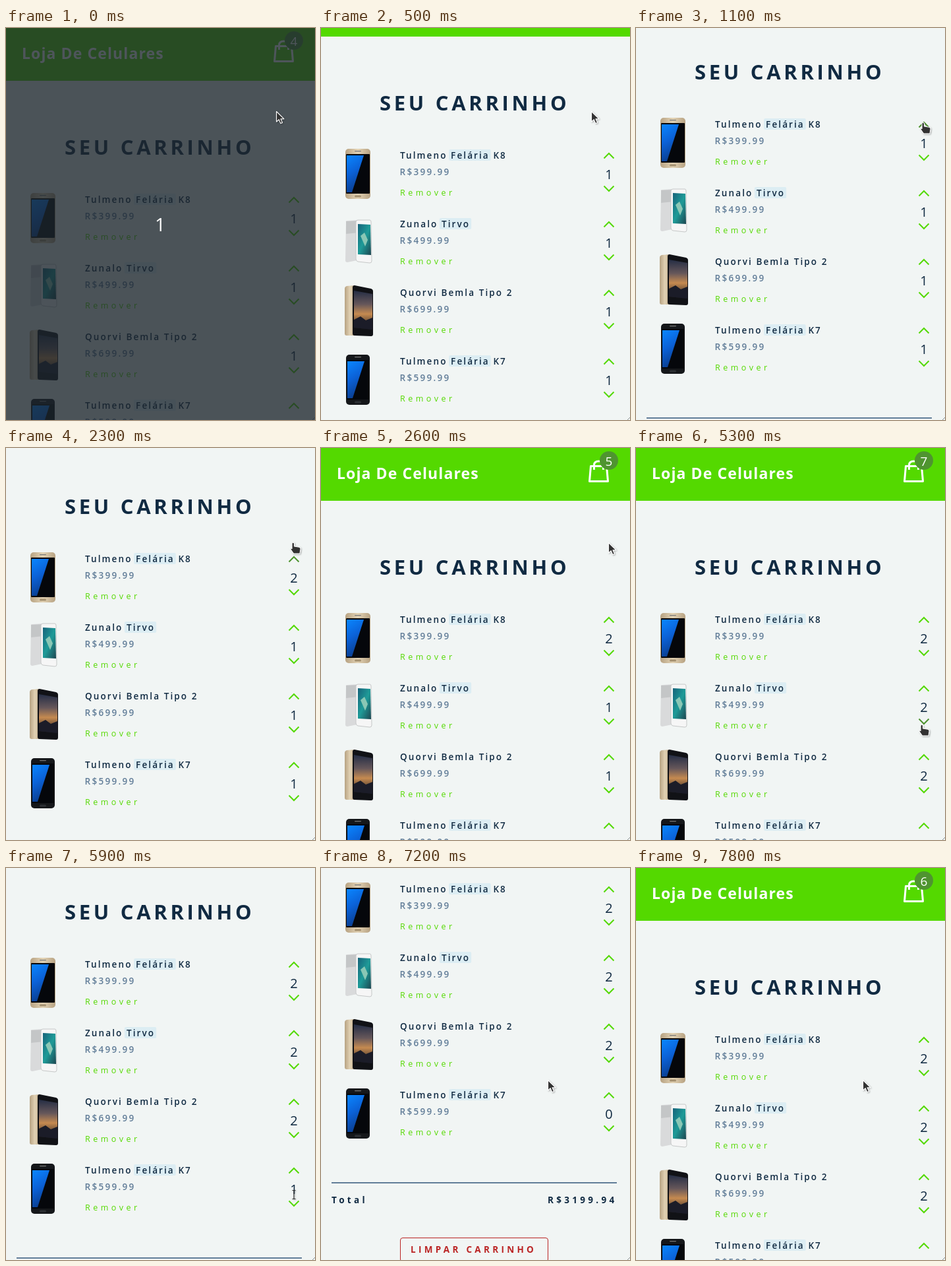
An HTML page for the animation above (8 s loop, 469 by 594 pixels).

```html
<!DOCTYPE html>
<html lang="pt-BR">
<head>
<meta charset="utf-8">
<title>Carrinho</title>
<style>
  html, body { margin: 0; width: 100%; height: 100%; overflow: hidden; background: #f1f5f4; }
  svg { display: block; width: 469px; height: 594px; }
  text { font-family: "Open Sans", "Noto Sans", sans-serif; white-space: pre; fill: #102a42; }
  .store { font-size: 23px; font-weight: 700; letter-spacing: 1.1px; fill: #fff; }
  .title { font-size: 31px; font-weight: 700; letter-spacing: 4.7px; }
  .name { font-size: 13.5px; font-weight: 600; letter-spacing: 2.1px; }
  .price { font-size: 13.5px; font-weight: 600; letter-spacing: 2.3px; fill: #617d98; }
  .remove { font-size: 12.5px; font-weight: 500; letter-spacing: 4.5px; fill: #54d900; }
  .count { font-size: 20px; font-weight: 500; text-anchor: middle; }
  .badge { font-size: 19px; text-anchor: middle; fill: #fff; }
  .total, .clear { font-size: 13.5px; font-weight: 700; letter-spacing: 4.3px; }
  .clear { fill: #bb2525; }
  .timer { font-size: 28px; text-anchor: middle; fill: #fff; }
  .chevron { fill: none; stroke-width: 2; }
</style>
</head>
<body>
<svg id="stage" viewBox="0 0 469 594">
  <defs>
    <linearGradient id="blue" x1="0" y1="0" x2=".3" y2="1">
      <stop offset="0" stop-color="#0a86ff"/><stop offset=".5" stop-color="#0b62d8"/><stop offset="1" stop-color="#0a3f92"/>
    </linearGradient>
    <linearGradient id="gold" x1="0" y1="0" x2="1" y2="0">
      <stop offset="0" stop-color="#b7a282"/><stop offset=".5" stop-color="#e2d2b4"/><stop offset="1" stop-color="#b7a282"/>
    </linearGradient>
    <linearGradient id="dusk" x1="0" y1="0" x2="0" y2="1">
      <stop offset="0" stop-color="#242d44"/><stop offset=".35" stop-color="#66575a"/>
      <stop offset=".6" stop-color="#c58a50"/><stop offset="1" stop-color="#15161f"/>
    </linearGradient>
    <linearGradient id="teal" x1="0" y1="0" x2="1" y2="1">
      <stop offset="0" stop-color="#16637a"/><stop offset=".5" stop-color="#1f9b98"/><stop offset="1" stop-color="#1c4650"/>
    </linearGradient>
    <filter id="shade" x="-50%" y="-50%" width="200%" height="200%">
      <feDropShadow dx="1" dy="1" stdDeviation="1" flood-opacity=".35"/>
    </filter>
  </defs>
</svg>
<script>
const LOOP = 8000, STEP = 100;
const GREEN = '#54d900', GREEN_HOVER = '#4f9430';
const ROW_TOP = 250, ROW_HEIGHT = 104;
const stage = document.getElementById('stage');

function add(parent, tag, attrs = {}, content) {
  const node = document.createElementNS('http://www.w3.org/2000/svg', tag);
  for (const key in attrs) node.setAttribute(key, attrs[key]);
  if (content !== undefined) node.textContent = content;
  parent.append(node);
  return node;
}
const label = (parent, cls, x, y, content) => add(parent, 'text', { class: cls, x, y }, content);
const box = (parent, x, y, width, height, fill, rx = 0) => add(parent, 'rect', { x, y, width, height, fill, rx });
const shape = (parent, d, fill, extra = {}) => add(parent, 'path', { d, fill, ...extra });

const page = add(stage, 'g');

// Header
box(page, 0, 0, 469, 80, GREEN);
label(page, 'store', 24, 47, 'Loja De Celulares');
shape(page, 'M409.5 27.5H433.5L435.5 50.5H407.5ZM414.5 33V26Q414.5 20 421.5 20T428.5 26V33', 'none',
  { stroke: '#fff', 'stroke-width': 3, 'stroke-linejoin': 'round' });
add(page, 'circle', { cx: 437, cy: 19, r: 14, fill: GREEN_HOVER });
const badge = label(page, 'badge', 437, 26.5, '');
label(page, 'title', 89, 192, 'SEU CARRINHO');

// Phones, drawn in coordinates of the first row
function slab(g, x, width, body, key) {
  box(g, x, 250, width, 76, body, 5);
  box(g, x + 1, 258, width - 2, 60, '#05070b', 1);
  shape(g, `M${x + 2} 260H${x + 28}L${x + 10} 316H${x + 2}Z`, 'url(#blue)');
  box(g, x + width / 2 - 5, 253, 10, 1.2, '#777', .6);
  box(g, x + width / 2 - 5, 320.5, 10, 3, key, 1.5);
}
function goldSlab(g) { slab(g, 37, 38, 'url(#gold)', '#a4906f'); }
function blackSlab(g) { slab(g, 38, 36, '#15171a', '#2d3034'); }
function whitePair(g) {
  shape(g, 'M38 257Q37 255 40 255L58 254 60 314 40 318Q37 318 37 315Z', '#d9dadb');
  shape(g, 'M38 256 57 255V273L38 275Z', '#c4c6c7');
  shape(g, 'M56 254 74 254Q76 254 76 257L77 316Q77 319 74 319L56 317Q53 316 53 313V257Q53 254 56 254Z', '#f6f6f6',
    { stroke: '#c6c8c8' });
  shape(g, 'M56 260 75 261 76 307 56 306Z', 'url(#teal)');
  shape(g, 'M60 278 66 273 71 284 67 294Z', '#8ac7b5');
}
function goldPair(g) {
  shape(g, 'M39 250 52 249V325H39Q36 325 36 322V254Q36 251 39 250Z', 'url(#gold)');
  shape(g, 'M51 249 76 254Q79 255 79 258V323Q79 326 76 326L51 325Q48 325 48 322V252Q48 249 51 249Z', '#111216');
  shape(g, 'M50 257 78 262V316L50 313Z', 'url(#dusk)');
  shape(g, 'M50 301 60 296 68 302 78 298V316L50 313Z', '#1b1c28');
}

const items = [
  { name: 'Tulmeno Felária K8', mark: 'Felária', price: 399.99, phone: goldSlab },
  { name: 'Zunalo Tirvo', mark: 'Tirvo', price: 499.99, phone: whitePair },
  { name: 'Quorvi Bemla Tipo 2', price: 699.99, phone: goldPair },
  { name: 'Tulmeno Felária K7', mark: 'Felária', price: 599.99, phone: blackSlab }
];

function highlight(name, content, word) {
  const first = content.indexOf(word);
  const left = name.getStartPositionOfChar(first).x - 3;
  const right = name.getEndPositionOfChar(first + word.length - 1).x + 2;
  name.before(box(name.parentNode, left, 251, right - left, 17, '#dcedf3', 2));
}

const rows = items.map((item, i) => {
  const g = add(page, 'g', { transform: `translate(0 ${i * ROW_HEIGHT})` });
  item.phone(g);
  const name = label(g, 'name', 120, 265, item.name);
  if (item.mark) highlight(name, item.name, item.mark);
  label(g, 'price', 119.5, 290, 'R$' + item.price);
  label(g, 'remove', 120, 321, 'Remover');
  return {
    up: shape(g, 'M429.5 264.5 437 257 444.5 264.5', 'none', { class: 'chevron' }),
    down: shape(g, 'M429.5 306.5 437 314 444.5 306.5', 'none', { class: 'chevron' }),
    count: label(g, 'count', 437, 296, '')
  };
});

// Total and button
box(page, 16, 704, 433, 2, '#617d98');
label(page, 'total', 16, 736, 'Total');
const total = label(page, 'total', 344, 736, '');
add(page, 'rect', { x: 120.5, y: 788.5, width: 224, height: 36, rx: 3.5, fill: 'none', stroke: '#bb2525' });
label(page, 'clear', 136, 811, 'LIMPAR CARRINHO');

shape(stage, 'M465 594 469 590', 'none', { stroke: '#8a9092' });

// Countdown screen
const veil = box(stage, 0, 0, 469, 594, 'rgb(29,38,46)');
const timer = label(stage, 'timer', 234, 308, '1');

// Pointers, each with its hot spot at 0,0
const pointer = add(stage, 'g');
const ink = { stroke: '#fff', 'stroke-width': 1.1, 'stroke-linejoin': 'round', filter: 'url(#shade)' };
const pointers = {
  arrow: shape(pointer, 'M.5 .5V16L4.2 12.7 6.8 18.6 9.5 17.4 7 11.7H11.8Z', '#333', ink),
  hand: shape(pointer, 'M-2 1.5Q-.5 -1 1.5 1.5V6L9 7.2Q11.5 7.8 11 10.5L10 17H.5L-4 10.5Q-4.5 8 -2 9.5Z', '#333', ink),
  beam: shape(pointer, 'M-2.5 -6.5H-.5L0 -6 .5 -6.5H2.5M0 -6V6M-2.5 6.5H-.5L0 6 .5 6.5H2.5', 'none',
    { stroke: '#333', 'stroke-width': 1.2, filter: 'url(#shade)' })
};

// Eased moves: when they begin, how long they last, where they lead
const scrolls = [
  { at: 400, span: 179, to: [114] },
  { at: 2190, span: 390, to: [0] },
  { at: 5400, span: 179, to: [114] },
  { at: 6900, span: 300, to: [228] },
  { at: 7200, span: 200, to: [270] },
  { at: 7600, span: 200, to: [0] }
];
const travels = [
  { at: 700, span: 400, to: [436, 143] },
  { at: 2700, span: 600, to: [441, 366] },
  { at: 3400, span: 200, to: [441, 394] },
  { at: 3600, span: 700, to: [439, 470] },
  { at: 4500, span: 800, to: [434, 419] },
  { at: 5600, span: 400, to: [437, 508] },
  { at: 6200, span: 500, to: [382, 366] },
  { at: 6900, span: 300, to: [344, 321] }
];
const clicks = [2100, 3400, 4400, 6100];

const ease = k => k * k * (3 - 2 * k);

function follow(moves, from, t) {
  return moves.reduce((here, { at, span, to }) => {
    const k = ease(Math.min(1, Math.max(0, (t - at) / span)));
    return here.map((v, i) => Math.ceil(v + (to[i] - v) * k));
  }, from);
}
const scrollAt = t => follow(scrolls, [0], t)[0];
const pointerAt = t => follow(travels, [410, 126], t);

// The part under the pointer; it is not looked up anew while the page glides
function hoverAt(t) {
  const [x, y] = pointerAt(t);
  const glide = scrolls.find(({ at, span }) => t > at && t < at + span);
  const offset = y + scrollAt(glide ? glide.at : t) - ROW_TOP;
  const row = Math.floor(offset / ROW_HEIGHT), inner = offset - row * ROW_HEIGHT;
  if (x < 427 || x > 447 || !rows[row] || inner > 70) return {};
  if (inner < 22) return { row, part: 'up' };
  if (inner > 52) return { row, part: 'down' };
  return { row, part: 'count' };
}

function render(time) {
  const t = Math.floor(time % LOOP / STEP) * STEP;
  page.setAttribute('transform', `translate(0 ${-scrollAt(t)})`);

  const counts = items.map(() => 1);
  for (const click of clicks.filter(at => at <= t)) {
    const { row, part } = hoverAt(click);
    counts[row] += part === 'up' ? 1 : -1;
  }
  badge.textContent = counts.reduce((sum, n) => sum + n);
  total.textContent = 'R$' + counts.reduce((sum, n, i) => sum + n * items[i].price, 0).toFixed(2);

  const hover = hoverAt(t);
  rows.forEach((row, i) => {
    row.count.textContent = counts[i];
    for (const side of ['up', 'down']) {
      row[side].setAttribute('stroke', hover.row === i && hover.part === side ? GREEN_HOVER : GREEN);
    }
  });

  pointer.setAttribute('transform', `translate(${pointerAt(t).join(' ')})`);
  const kind = !hover.part ? 'arrow' : hover.part === 'count' ? 'beam' : 'hand';
  for (const name in pointers) pointers[name].setAttribute('display', name === kind ? 'inline' : 'none');

  veil.setAttribute('opacity', .78 * Math.max(0, 1 - t / 180));
  timer.setAttribute('opacity', t < 100 ? 1 : 0);
}

const start = performance.now();
function loop() {
  render(performance.now() - start);
  requestAnimationFrame(loop);
}
loop();
</script>
</body>
</html>
```
